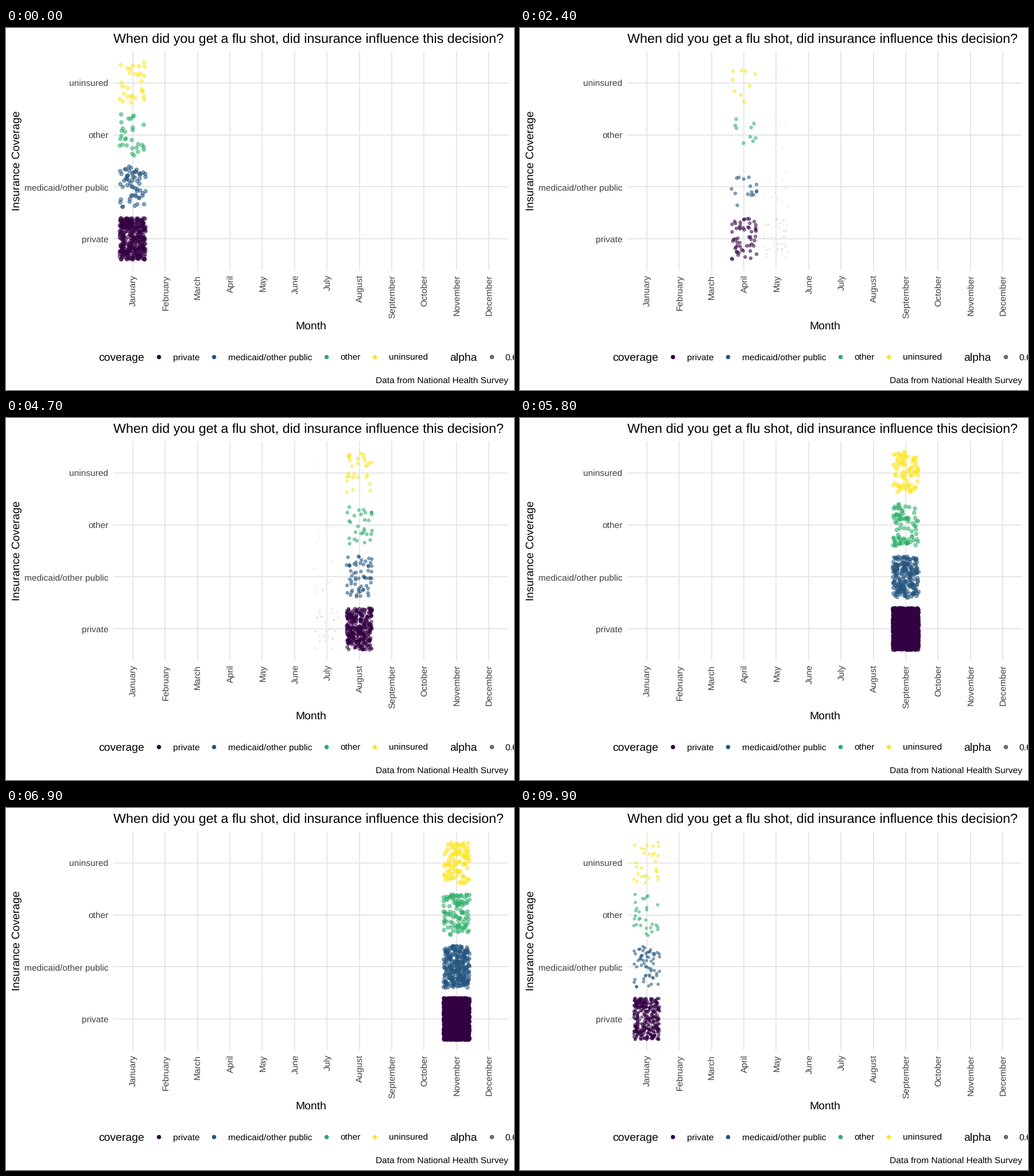
A matplotlib script for the animation above (10 s loop, 885 px wide and 632 px high).

```python
import numpy as np
import matplotlib.pyplot as plt
from matplotlib.animation import FuncAnimation

plt.rcParams["font.family"] = "Liberation Sans"
plt.rcParams["text.hinting"] = "none"

W, H, DPI = 885, 632, 128
FRAMES, INTERVAL = 100, 100
PT = 72 / DPI            # one pixel in points
SMALL, MEDIUM, LARGE = 15.45, 19.35, 23.22
ALPHA = 0.55
DOT, RING = 6.4, 1.1     # marker diameter and outline, pixels

MONTHS = ["January", "February", "March", "April", "May", "June", "July",
          "August", "September", "October", "November", "December"]
GROUPS = ["private", "medicaid/other public", "other", "uninsured"]
COLORS = ["#330042", "#245680", "#2bae67", "#fde61e"]

X0, DX = 220.7, 56.42
Y0, DY = 368.3, -90.9
LEFT, RIGHT = X0 - 0.6 * DX, X0 + 11.6 * DX
TOP, BOTTOM = Y0 + 3.6 * DY, Y0 - 0.6 * DY

# privately insured answers per month
PRIVATE = [310, 150, 95, 55, 36, 25, 28, 320, 1500, 2400, 2000, 900]

fig = plt.figure(figsize=(W / DPI, H / DPI), dpi=DPI, facecolor="white")
ax = fig.add_axes([0, 0, 1, 1])
ax.set_xlim(0, W)
ax.set_ylim(H, 0)
ax.axis("off")
rng = np.random.default_rng(12)


def label(x, y, text, size=SMALL, color="black", ha="left", turn=0):
    ax.text(x, y, text, fontsize=size * PT, color=color, ha=ha,
            va="baseline", rotation=turn, rotation_mode="anchor")


def dots(xy, color, alpha):
    x, y = np.transpose(xy)
    return ax.scatter(x, y, s=(DOT * PT) ** 2, c=color, edgecolors=color,
                      linewidths=RING * PT, alpha=alpha, zorder=3)


def draw_chart():
    grid = dict(color="#e6e6e6", lw=1.87 * PT, zorder=1,
                solid_capstyle="butt")
    for i, month in enumerate(MONTHS):
        x = X0 + i * DX
        ax.plot([x, x], [TOP, BOTTOM], **grid)
        label(x + 5.4, 430.8, month, color="#3f3f3f", ha="right", turn=90)
    for i, group in enumerate(GROUPS):
        y = Y0 + i * DY
        ax.plot([LEFT, RIGHT], [y, y], **grid)
        label(178.5, y + 6.05, group, color="#3f3f3f", ha="right")

    label(LEFT, 26.6, "When did you get a flu shot, "
          "did insurance influence this decision?", LARGE)
    label(531, 526.3, "Month", MEDIUM, ha="center")
    label(23.8, 232, "Insurance Coverage", MEDIUM, ha="center", turn=90)
    label(RIGHT, 619.7, "Data from National Health Survey", ha="right")


def draw_legend():
    y = 573.8
    label(161.5, y + 7, "coverage", MEDIUM)
    for x, group, color in zip([266, 362, 557.6, 642.4], GROUPS, COLORS):
        dots([(x, y)], color, 1)
        label(x + 24.6, y + 5.7, group)
    label(773.3, y + 7, "alpha", MEDIUM)
    dots([(845.7, y)], "black", ALPHA)
    label(869.8, y + 5.7, "0.6")


def month_dots(m):
    """Jittered answers; the smaller groups grow slower than the largest."""
    n = PRIVATE[m]
    few = round(0.65 * n ** 0.66)
    counts = [n, round(0.6 * n ** 0.8), few, few]
    group = np.repeat(np.arange(4), counts)
    jitter = rng.uniform(-0.4, 0.4, (len(group), 2))
    xy = jitter * (DX, DY) + np.column_stack(
        [np.full(len(group), X0 + m * DX), Y0 + group * DY])
    return dots(xy, np.take(COLORS, group), ALPHA)


def leave(m):
    return 2 + 7 * m


def gone(m):
    return min(6 + 7 * m, 82)


def scale(m, t):
    """Grow while the previous month shrinks, hold, then shrink away."""
    start, full = (leave(m - 1), gone(m - 1)) if m else (-3, 0)
    p = np.interp(t, [start, full, leave(m), gone(m)], [0, 1, 1, 0])
    return p * p * (3 - 2 * p)


def update(frame):
    t = frame - FRAMES if frame >= 97 else frame
    for m, cloud in enumerate(clouds):
        k = scale(m, t)
        cloud.set_visible(k > 0)
        cloud.set_sizes([(DOT * PT * k) ** 2])
        cloud.set_linewidths([RING * PT * k])
    return clouds


draw_chart()
draw_legend()
clouds = [month_dots(m) for m in range(12)]
anim = FuncAnimation(fig, update, frames=FRAMES, interval=INTERVAL,
                     repeat=True, repeat_delay=0, blit=False)
plt.show()
```
